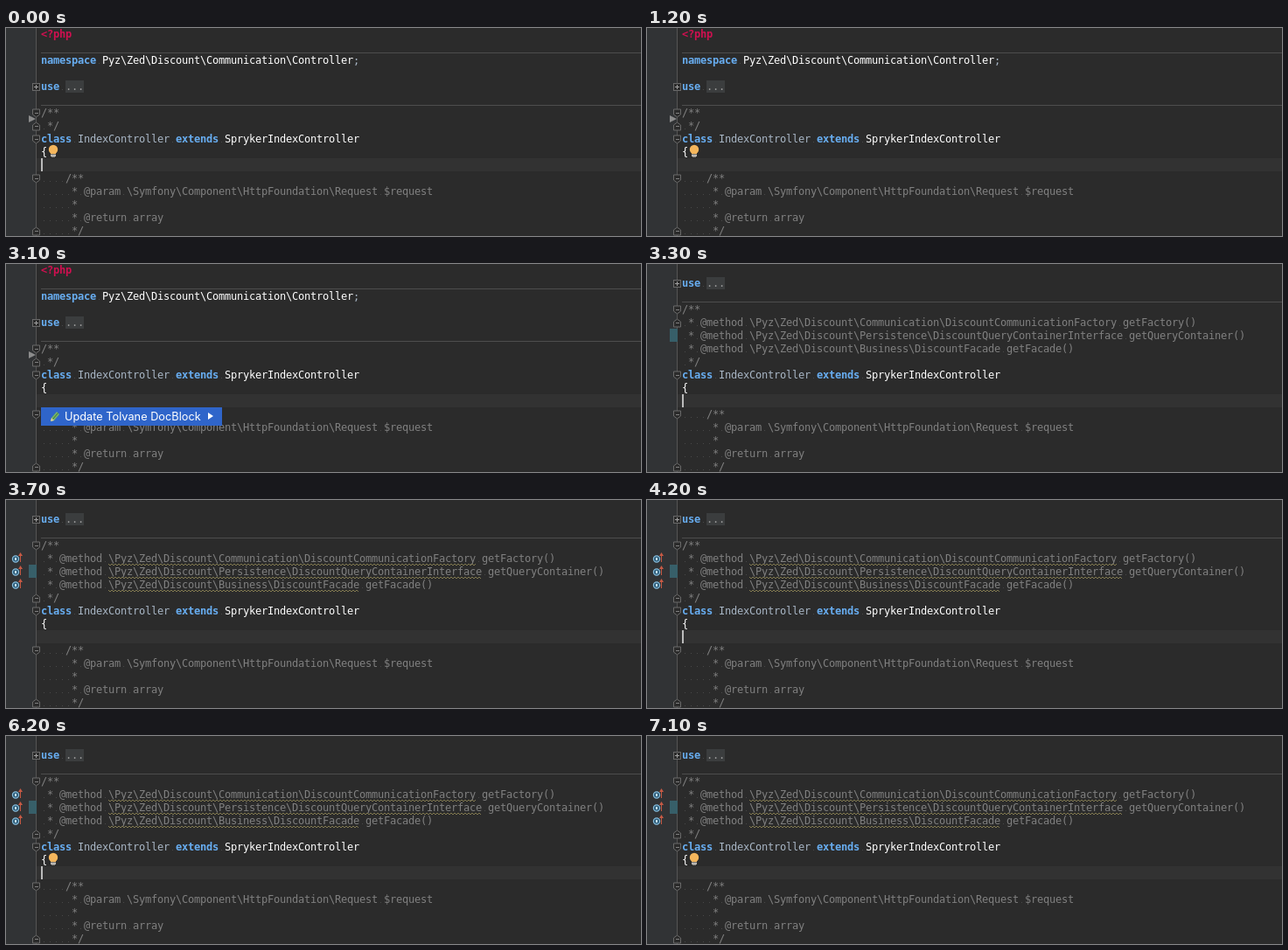
Write an HTML page with a canvas that moves like this. It is 726x238 px and loops after 7200 ms.

```html
<!DOCTYPE html>
<html lang="en">
<head>
<meta charset="utf-8">
<title>Editor: generate doc block</title>
<style>
html, body { margin: 0; width: 100%; height: 100%; overflow: hidden; background: #2b2b2b; }
canvas { display: block; }
</style>
</head>
<body>
<canvas id="stage" width="726" height="238"></canvas>
<script>
const ctx = document.getElementById('stage').getContext('2d');
const LOOP = 7200, POPUP = 1800, INSERT = 3300, INSPECT = 3700, BULB = 5000;
const LEFT = 40, CELL = 7;
const MONO = '12px "DejaVu Sans Mono", monospace';
const KEY = '#68aef2', WHITE = '#ffffff', PLAIN = '#a9b7c6', DOC = '#808080', TAG = '#cf1050';

const methods = [
  ['\\Pyz\\Zed\\Discount\\Communication\\DiscountCommunicationFactory', 'getFactory()'],
  ['\\Pyz\\Zed\\Discount\\Persistence\\DiscountQueryContainerInterface', 'getQueryContainer()'],
  ['\\Pyz\\Zed\\Discount\\Business\\DiscountFacade', 'getFacade()']
];

function rect(x, y, w, h, color) {
  ctx.fillStyle = color;
  ctx.fillRect(x, y, w, h);
}

function path(points, color, fill) {
  ctx.beginPath();
  points.forEach(([x, y]) => ctx.lineTo(x, y));
  if (fill) { ctx.fillStyle = color; ctx.fill(); }
  else { ctx.strokeStyle = color; ctx.lineWidth = 1; ctx.stroke(); }
}

// Text sits on a fixed character grid; y is the middle of the line.
function code(y, ...parts) {
  let x = LEFT;
  for (const [text, color, bold] of parts) {
    ctx.font = (bold ? 'bold ' : '') + MONO;
    for (const char of text) {
      if (char === ' ') rect(x + 3, y + 3, 1, 1, '#484848');
      else {
        ctx.fillStyle = color;
        ctx.fillText(char, x, y + 4);
      }
      x += CELL;
    }
  }
}

const doc = (y, text) => code(y, [text, DOC]);

function separator(y) { rect(LEFT, y, 726 - LEFT, 1, '#4d4d4d'); }

function fold(y, dir) {
  const s = [[30.5, -4.5], [38.5, -4.5], [38.5, 1.5], [34.5, 4.5], [30.5, 1.5], [30.5, -4.5]]
    .map(([x, dy]) => [x, y + 0.5 + dy * dir]);
  path(s, '#2b2b2b', true);
  path(s, '#6a6a6a');
  rect(33, y, 4, 1, '#808080');
}

function useLine(y) {
  rect(68, y - 7, 21, 14, '#3b3d3e');
  code(y, ['use', KEY, true], [' ', KEY], ['...', '#9a9a9a']);
  rect(30, y - 4, 9, 9, '#6a6a6a');
  rect(31, y - 3, 7, 7, '#2b2b2b');
  rect(32, y, 5, 1, '#a0a0a0');
  rect(34, y - 2, 1, 5, '#a0a0a0');
}

function wave(x, end, y) {
  const points = [];
  for (let i = 0; x <= end; x += 2, i++) points.push([x, y + (i % 2) * 2]);
  path(points, '#827a50');
}

function overrideIcon(y) {
  ctx.beginPath();
  ctx.arc(11, y + 0.5, 3.6, 0, 7);
  ctx.fillStyle = '#315f7c';
  ctx.fill();
  ctx.strokeStyle = '#86bddc';
  ctx.lineWidth = 1.2;
  ctx.stroke();
  rect(10, y - 1, 2, 3, '#c3dfed');
  rect(16, y - 5, 1, 9, '#c75a45');
  path([[14, y - 3], [16.5, y - 7], [19, y - 3]], '#c75a45', true);
}

function bulb() {
  ctx.beginPath();
  ctx.arc(54, 139, 5.2, 0, 7);
  ctx.fillStyle = '#f4b65c';
  ctx.fill();
  rect(51, 142, 6, 2, '#f4b65c');
  rect(51, 144, 6, 1, '#77736c');
  rect(51, 145, 6, 2, '#b8b6b2');
  rect(52, 147, 4, 1, '#8a8884');
}

function popup() {
  rect(40, 164, 207, 21, '#2f65ca');
  ctx.font = '12.75px Inter, sans-serif';
  ctx.fillStyle = WHITE;
  ctx.fillText('Update Tolvane DocBlock', 67, 179);
  path([[231, 170], [237, 174], [231, 178]], WHITE, true);
  path([[51, 180], [52, 176], [58, 169], [61, 172], [55, 179]], '#77b766', true);
  path([[51, 180], [52, 176], [55, 179]], '#e2d3a6', true);
  path([[53.5, 177.5], [59.5, 170.5]], '#3c6e3a');
}

function header() {
  code(7, ['<?php', TAG, true]);
  separator(28);
  code(37, ['namespace', KEY, true], [' ', KEY],
    ['Pyz\\Zed\\Discount\\Communication\\Controller', WHITE], [';', PLAIN]);
  useLine(67);
  separator(88);
  doc(97, '/**');
  fold(97, 1);
  fold(112, -1);
  path([[26, 100], [34, 104], [26, 108]], '#8c8c8c', true);
}

function insertedBlock(inspected) {
  useLine(22);
  separator(43);
  doc(52, '/**');
  rect(26, 74, 9, 15, '#375f69');
  methods.forEach(([type, call], i) => {
    const y = 67 + 15 * i;
    doc(y, ` * @method ${type} ${call}`);
    if (inspected) {
      wave(117, 117 + type.length * CELL, y + 6);
      overrideIcon(y);
    }
  });
  fold(52, 1);
  fold(inspected ? 112 : 67, -1);
}

function classBody() {
  doc(112, ' */');
  code(127, ['class', KEY, true], [' IndexController ', PLAIN], ['extends', KEY, true],
    [' SprykerIndexController', WHITE]);
  code(142, ['{', WHITE]);
  doc(172, '    /**');
  doc(187, '     * @param \\Symfony\\Component\\HttpFoundation\\Request $request');
  doc(202, '     *');
  doc(217, '     * @return array');
  doc(232, '     */');
  fold(127, 1);
  fold(172, 1);
  fold(232, -1);
}

function draw(t) {
  const inserted = t >= INSERT;
  const menu = t >= POPUP && !inserted;
  const blink = (t + (inserted ? 800 : 400)) % 1000 < 500;

  rect(0, 0, 726, 238, '#2b2b2b');
  rect(0, 0, 34, 238, '#313335');
  rect(35, 149, 691, 15, '#323232');
  rect(34, 0, 1, 238, '#555555');

  if (inserted) insertedBlock(t >= INSPECT);
  else header();
  classBody();

  if (menu) popup();
  else if (blink) rect(40, 149, 2, 15, '#bbbbbb');
  if (t < POPUP || t >= BULB) bulb();
}

function tick() {
  draw(performance.now() % LOOP);
  requestAnimationFrame(tick);
}
tick();
</script>
</body>
</html>
```
